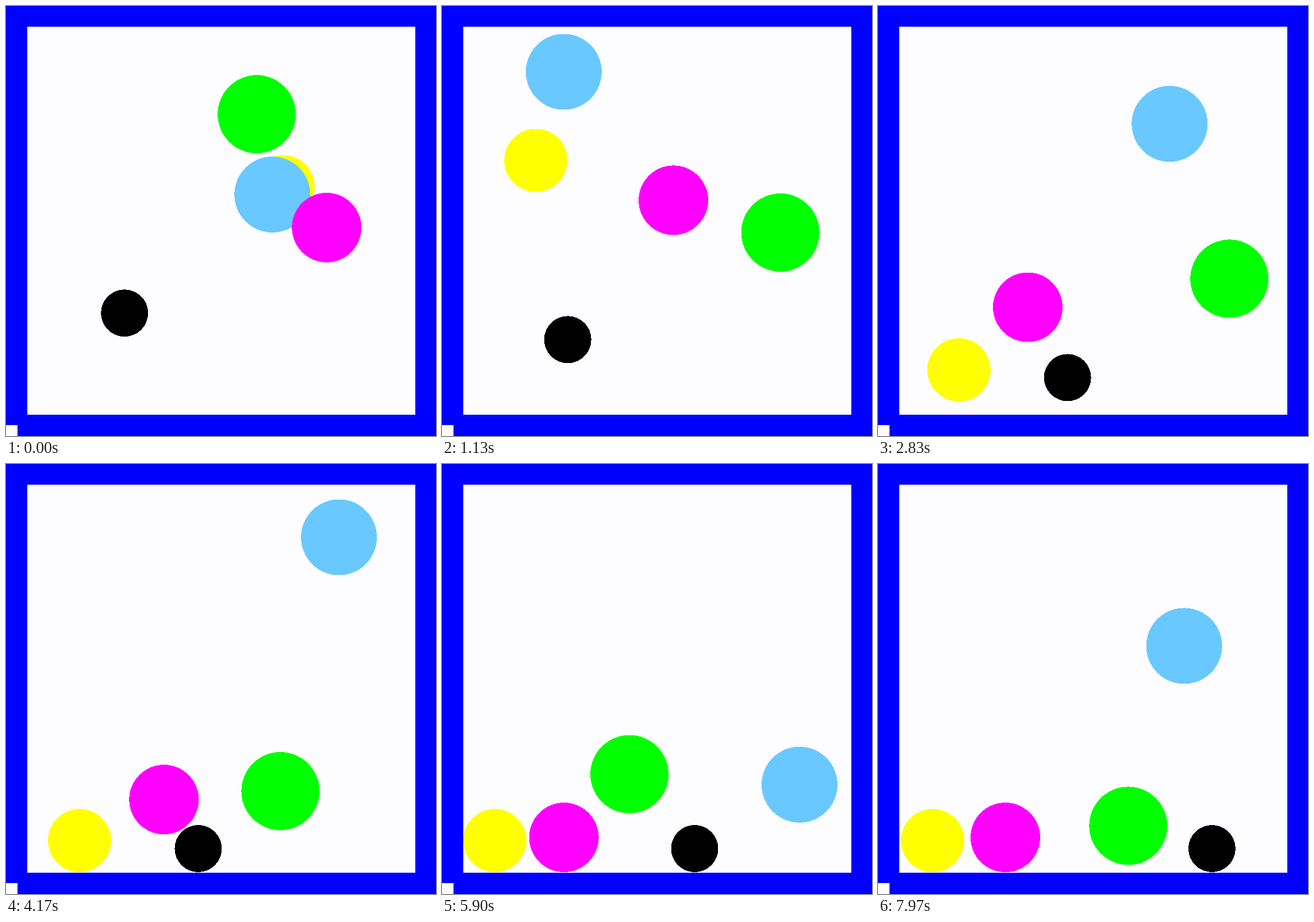
These frames come from a looping animation (748 by 748 pixels, 8000 ms). An HTML page:

```html
<!DOCTYPE html>
<html lang="en">
<head>
<meta charset="utf-8">
<title>Bouncing balls</title>
<style>
  html, body { margin: 0; width: 100%; height: 100%; overflow: hidden; background: #fdfcff; }
  svg { display: block; width: 100vw; height: 100vh; shape-rendering: crispEdges; }
</style>
</head>
<body>
<svg id="stage" viewBox="0 0 748 748">
  <rect width="748" height="748" fill="#0000ff"/>
  <rect x="37" y="36" width="675" height="675" fill="#fdfcff"/>
  <rect y="728.5" width="19.5" height="19.5" fill="#fdfcff"/>
</svg>
<script>
const LOOP = 8000;
const GRAVITY = 1.8e-4;  // px per ms squared
const RESTITUTION = 0.8; // speed kept when a side wall is hit
const LEFT = 37, RIGHT = 711, FLOOR = 710;

// Impacts are [time, x, y]; without y the ball is on the floor.
// An x beyond a wall is where the ball would be had it not bounced back.
const balls = [
  { r: 55, color: "#ffff00", impacts: [
    [0, 482, 314.5], [1130, 163.3, 268.5], [2830, 31, 633], [4150, 128], [5470, 131], [5900, 92], [8000, 95]] },
  { r: 66, color: "#69c8ff", impacts: [
    [0, 463.3, 328], [1130, -33, 114.5], [1880, 455, 470], [2830, 507.3, 205], [4170, 579.2, 127.5],
    [6104, 685], [8000, 531.3, 316.3]] },
  { r: 68, color: "#00ff00", impacts: [
    [0, 436.2, 188.2], [1130, 711, 394], [1880, 442, 603], [4170, 850, 569], [4490, 432],
    [5470, 305, 515], [6560, 358.5], [8000, 437, 633]] },
  { r: 60.5, color: "#ff00ff", impacts: [
    [0, 557.8, 385.4], [1440, 360, 365], [2830, 260.5, 524], [4190, 275, 587], [5130, 257.5],
    [5970, 208], [8000, 221.7]] },
  { r: 41, color: "#000000", impacts: [
    [0, 206.2, 534.2], [1608, 224], [2830, 329.7, 646.4], [4170, 334.4], [4370, 335], [8000, 583]] },
];

const stage = document.getElementById("stage");
for (const ball of balls) {
  ball.node = document.createElementNS(stage.namespaceURI, "circle");
  ball.node.setAttribute("r", ball.r);
  ball.node.setAttribute("fill", ball.color);
  stage.append(ball.node);
}

function reflect(x, r) {
  const inside = Math.min(Math.max(x, LEFT + r), RIGHT - r);
  return inside - (x - inside) * RESTITUTION;
}

function positionAt({ r, impacts }, time) {
  const floor = FLOOR - r;
  const next = impacts.findIndex(([t]) => t > time);
  const [t0, x0, y0 = floor] = impacts[next - 1];
  const [t1, x1, y1 = floor] = impacts[next];
  const part = (time - t0) / (t1 - t0);
  const from = reflect(x0, r);
  const rolling = y0 === floor && y1 === floor;
  const lift = rolling ? 0 : GRAVITY / 2 * (time - t0) * (t1 - time);
  return [reflect(from + (x1 - from) * part, r), y0 + (y1 - y0) * part - lift];
}

function draw(time) {
  for (const ball of balls) {
    const [x, y] = positionAt(ball, time);
    ball.node.setAttribute("cx", x);
    ball.node.setAttribute("cy", y);
  }
}

let start;
function tick(now) {
  start ??= now;
  draw((now - start) % LOOP);
  requestAnimationFrame(tick);
}
draw(0);
requestAnimationFrame(tick);
</script>
</body>
</html>
```
